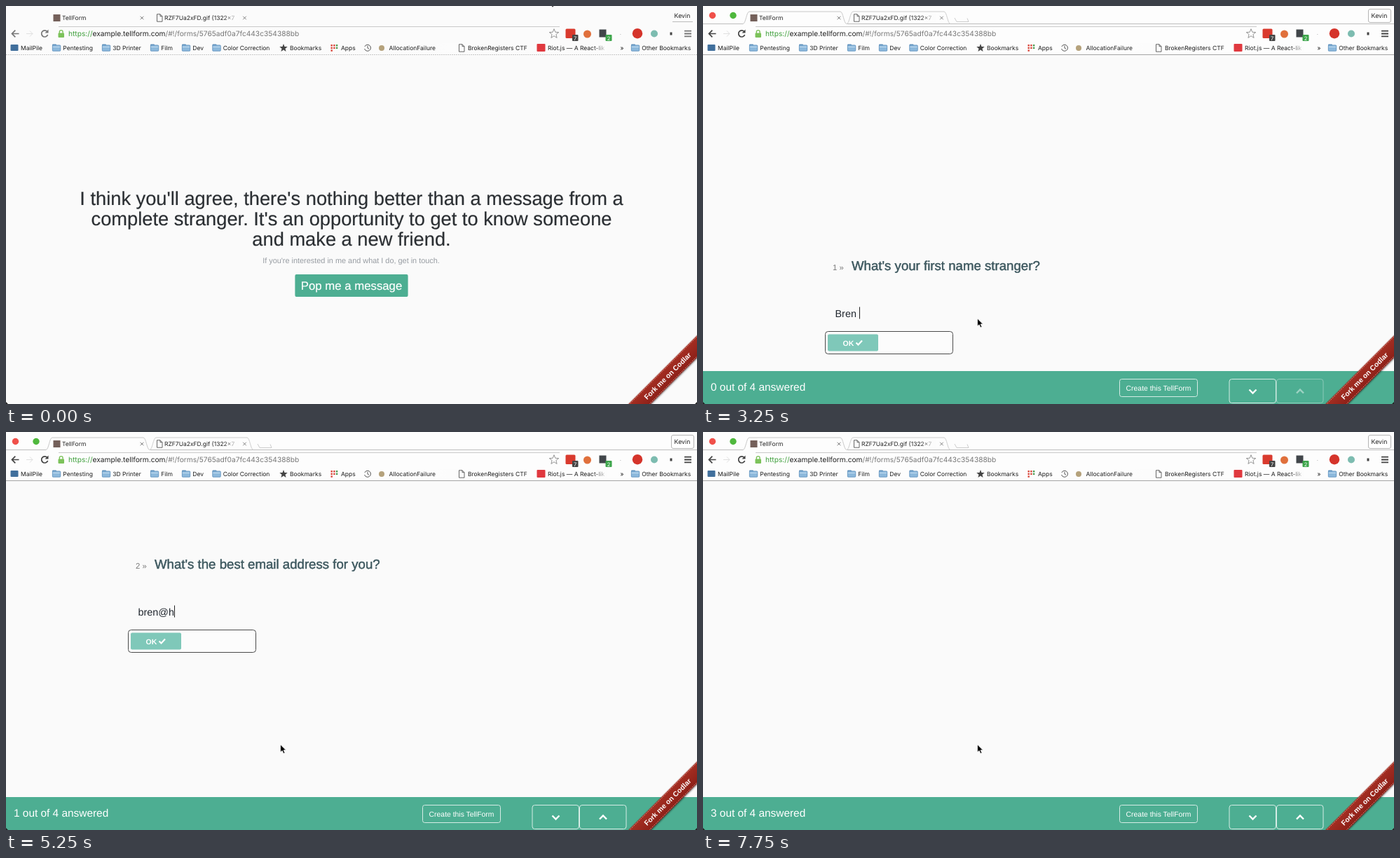
Animation, 986 px wide and 568 px high, one loop 8 s. Source, as an HTML page:

```html
<!DOCTYPE html>
<html lang="en">
<head>
<meta charset="utf-8">
<title>Form demo</title>
<style>
  html, body { margin: 0; width: 100%; height: 100%; overflow: hidden; background: #fafafa; }
  svg { display: block; }
  text { white-space: pre; font-family: "Liberation Sans", Arial, sans-serif; text-rendering: geometricPrecision; }
  .ui text { font-family: Inter, sans-serif; }
</style>
</head>
<body>
<svg id="stage" width="986" height="568" viewBox="0 0 986 568"></svg>
<script>
const LOOP = 8000, GREEN = '#4dae92', INK = '#2b2f33', SLATE = '#3c575e';

// Markup helpers
const text = (x, y, size, fill, str, more = '') =>
  `<text x="${x}" y="${y}" font-size="${size}" fill="${fill}" ${more}>${str}</text>`;
const rect = (x, y, w, h, fill, r = 0, more = '') =>
  `<rect x="${x}" y="${y}" width="${w}" height="${h}" rx="${r}" fill="${fill}" ${more}/>`;
const dot = (x, y, r, fill) => `<circle cx="${x}" cy="${y}" r="${r}" fill="${fill}"/>`;
const line = (d, stroke, width = 1, more = '') =>
  `<path d="${d}" fill="none" stroke="${stroke}" stroke-width="${width}" ${more}/>`;
const shape = (d, fill, more = '') => `<path d="${d}" fill="${fill}" ${more}/>`;
const group = (id, body, more = '') => `<g id="${id}" ${more}>${body}</g>`;
const middle = 'text-anchor="middle"';
const heavier = (color, width) => `stroke="${color}" stroke-width="${width}"`;

const folder = x => rect(x, 54.5, 6, 3, '#5f92bd', 1) + rect(x, 56, 12, 8.5, '#8db9dc', 1) +
  line(`M${x + .5} 58.5h11`, '#c3dcf0') + rect(x + .3, 55.8, 11.4, 8.4, 'none', 1, heavier('#5d8fba', .7));
const page = (x, y) => line(`M${x} ${y}h4.5l3 3v7.5h-7.5zM${x + 4.5} ${y}v3h3`, '#555', .9);
const star = (x, y, r, more) => {
  const points = Array.from({ length: 10 }, (_, i) => {
    const a = i * Math.PI / 5, d = i % 2 ? r * .43 : r;
    return [x + d * Math.sin(a), y - d * Math.cos(a)].map(v => v.toFixed(1));
  });
  return `<polygon points="${points.join(' ')}" ${more}/>`;
};
const fade = (x, y, w) => rect(x, y, w, 13, 'url(#fade)');
const cross = (x, y) => line(`M${x - 2.3} ${y - 2.3}l4.6 4.6m0-4.6l-4.6 4.6`, '#777', .9);
const label = (x, str) => text(x, 62.7, 8.5, '#1c1c1c', str);
const tab = x => `M${x} 25.5c4 0 5-17.5 9-17.5h130c4 0 5 17.5 9 17.5`;

function tabStrip() {
  return group('active',
      rect(0, 0, 986, 70, '#fdfdfd') + dot(13.5, 13.5, 4.7, '#f0504a') + dot(43, 13.5, 4.7, '#4fb83d') +
      line('M0 25.5h57M206 25.5h780', '#bdbdbd') + line(tab(57), '#c2c2c2', .9) + line(tab(205), '#c8c8c8', .9) +
      line('M359 17l3 5.5h17l-2-5', '#ccc') + line('M0 69.5h986', '#a4a4a4') +
      rect(949.5, 4.5, 32, 19, '#fff', 2.5, 'stroke="#b4b4b4"')) +
    group('inactive', line('M951 22.5h29', '#bbb') + line('M0 69.5h986', '#c8c8c8', 1, 'stroke-dasharray="2 1"')) +
    rect(67.5, 12, 10, 10, '#74605a') + text(80, 20.2, 8.5, '#222', 'TellForm') + cross(194, 17) +
    page(215.5, 11.7) + text(226, 20.2, 8.5, '#222', 'RZF7Ua2xFD.gif (1322×7') + fade(310, 10, 22) + cross(340.5, 17) +
    text(965, 17, 8.8, '#222', 'Kevin', middle);
}

function toolbar() {
  const nav = line('M18.5 39.5h-10m4.8-4.8l-4.8 4.8l4.8 4.8', 'currentColor', 1.7) +
    line('M58.7 36.3a4.6 4.6 0 1 0 .9 4.7', 'currentColor', 1.7) + shape('M60.5 33.5v5h-5z', 'currentColor') +
    line('M968 35.7h10M968 39.5h10M968 43.3h10', 'currentColor', 1.8);
  return group('nav', nav) + line('M29 39.5h9m-4-4l4 4l-4 4', '#e0e0e0') +
    line('M75 29.5h715', '#c9c9c9') +
    rect(74.5, 38.5, 8.5, 6.5, '#7cc25a', 1) + line('M76.3 39v-2a2.4 2.4 0 0 1 4.8 0v2', '#7cc25a', 1.4) +
    `<text x="89" y="43" font-size="10.2" fill="#777"><tspan fill="#3d9f3a">https://</tspan><tspan fill="#222">example.tellform.com</tspan>/#!/forms/5765adf0a7fc443c354388bb</text>` +
    star(782, 39.7, 7, 'fill="#fff" stroke="#888" stroke-width=".9"') +
    rect(798.5, 32.5, 14, 13.5, '#d93a2e', 1.5) + rect(808, 41, 8.5, 9, '#444', 1) + text(812.2, 48.7, 7.5, '#fff', '7', middle) +
    dot(829.5, 40, 5.5, '#e0703c') + rect(846.5, 33.5, 10, 11, '#41464a') +
    rect(855.5, 41, 9, 9, '#3da54b', 1) + text(860, 48.7, 7.5, '#fff', '2', middle) +
    rect(876, 40, 1.5, 1, '#ccc') + dot(901, 39.2, 7.2, '#d5342b') + dot(925, 39.5, 5, '#7dbcb0') + rect(947.5, 37.5, 3, 4, '#444');
}

function bookmarks() {
  const grid = [0, 1, 2, 3, 4, 5, 6].map(i =>
    rect(463.5 + i % 3 * 3.7, 55 + (i / 3 | 0) * 3.7, 2.4, 2.4, ['#d9463b', '#d9463b', '#4a9b50'][i % 3])).join('');
  const folders = [[66, 'Pentesting'], [137, '3D Printer'], [206, 'Film'], [251, 'Dev'], [294.5, 'Color Correction'], [892, 'Other Bookmarks']];
  return rect(6.5, 55, 11, 9, '#416f9c', 1) + label(21, 'MailPile') +
    folders.map(([x, name]) => folder(x) + label(x + 15.3, name)).join('') +
    star(396, 60, 6, 'fill="#444"') + label(405, 'Bookmarks') + grid + label(478, 'Apps') +
    line('M511.8 58a4.5 4.5 0 1 1-.2 3M516 57v3l2 1.3', '#555', 1) +
    dot(536, 60, 4, '#b5a27c') + label(546.5, 'AllocationFailure') + fade(610, 53, 19) + rect(629, 53, 14, 13, '#fcfcfc') +
    page(646.5, 54.7) + label(659, 'BrokenRegisters CTF') +
    rect(757.5, 54, 12, 11, '#e0393f', 1) + label(773, 'Riot.js — A React-lik') + fade(838, 53, 20) + label(876.5, '»');
}

function welcome() {
  const lines = ["I think you'll agree, there's nothing better than a message from a",
    "complete stranger. It's an opportunity to get to know someone", 'and make a new friend.'];
  return lines.map((s, i) => text(493, 284 + 29 * i, 27.25, INK, s, middle + heavier(INK, .2))).join('') +
    text(492.5, 367, 10.9, '#979ca2', "If you're interested in me and what I do, get in touch.", middle) +
    rect(412.4, 383, 161.2, 32, GREEN, 2) + text(493, 404.7, 16.8, '#fff', 'Pop me a message', middle + heavier('#fff', .2));
}

// Questions are drawn relative to their heading baseline
const heading = (x, n, str) => text(x, 0, 11.3, '#777', n + ' »') +
  text(x + 27, 0, 18.65, SLATE, str, heavier(SLATE, .45));
const okButton = id => group(id, rect(174.5, 87.5, 182, 32, '#fcfcfc', 4, 'stroke="#4a4a4a"') +
  rect(178, 91.5, 72, 24, '#7fc8b9', 2) + text(199.5, 107.5, 10.5, '#fff', 'OK', 'font-weight="bold"') +
  line('M218.5 103.5l3 3l5.5-6', '#fff', 2.2));
const field = id => text(188.5, 66.5, 14.4, '#20262e', '', `id="${id}"`) +
  rect(0, 52.5, 1, 17, '#222', 0, `id="${id}Caret"`);

function choice(n, x, y, textX, str) {
  return rect(x, y, 183, 25, '#fcfcfc', 3, 'stroke="#777"') +
    text(x + 25.5, y + 16, 10, n === 3 ? '#c4c4c4' : '#666', n, 'font-weight="bold"') +
    line(`M${textX - 13} ${y + 10}q3-2 6 0`, '#aaa', .8, 'stroke-dasharray="1 2"') + text(textX, y + 16, 10.8, '#666d75', str);
}

function questions() {
  return group('q1', heading(185, 1, "What's your first name stranger?") + field('name') + okButton('ok1')) +
    group('q2', heading(185, 2, "What's the best email address for you?") + field('email') +
      group('error', dot(190.7, 101.5, 4.8, '#a83c3c') + rect(190, 98.3, 1.5, 4, '#fff') + rect(190, 103.3, 1.5, 1.5, '#fff') +
        text(199, 105.5, 10.4, '#a5403f', 'Please enter a valid email address')) + okButton('ok2')) +
    group('q3', heading(173.5, 3, "What's your message about?") +
      choice(1, 179.5, 46.5, 230.5, "I'd like to work with you") + choice(2, 373.5, 46.5, 428.5, 'I have some feedback') +
      choice(3, 179.5, 82.5, 221.5, "I'm looking for some advice") + choice(4, 373.5, 82.5, 437, "I'd just like to chat"));
}

function footer() {
  const key = (x, d) => rect(x, 532.5, 66.5, 34, 'none', 3.5, 'stroke="#d5ece5"') + line(`M${x + 28.5} ${d}`, '#fff', 2.4);
  return rect(0, 521, 986, 47, GREEN) + text(11, 549, 15.4, '#fff', '', 'id="count"') +
    rect(594.5, 532.5, 111, 25, 'none', 3, 'stroke="#d5ece5"') + text(650, 549, 10.4, '#fff', 'Create this TellForm', middle) +
    key(751, '547.5l5 5l5-5') + group('up', key(818.5, '552.5l5-5l5 5'));
}

function ribbon() {
  const stitch = y => line(`M-90 ${y}h180`, '#d9958c', .8, 'stroke-dasharray="2 1.5"');
  return `<g transform="translate(944 528) rotate(-45)">` +
    rect(-90, -11.2, 180, 22.4, 'url(#red)', 0, 'style="filter: drop-shadow(0 1.5px 1px #0008)"') +
    stitch(-9.9) + stitch(9.9) +
    text(0, 3.6, 10.2, '#fff', 'Fork me on Codlar', `${middle} font-weight="bold"`) + '</g>';
}

document.getElementById('stage').innerHTML = `<defs>
  <linearGradient id="fade"><stop stop-color="#fcfcfc" stop-opacity="0"/><stop offset="1" stop-color="#fcfcfc"/></linearGradient>
  <linearGradient id="red" x2="0" y2="1"><stop stop-color="#a52e22"/><stop offset="1" stop-color="#8c2018"/></linearGradient></defs>` +
  rect(0, 0, 986, 568, '#fafafa') + group('welcome', welcome()) + questions() +
  rect(979, 0, 6, 108, '#808080', 3, 'id="thumb"') +
  group('chrome', rect(0, 0, 986, 69, '#fbfbfb') + tabStrip() + toolbar() + bookmarks(), 'class="ui"') +
  group('footer', footer()) + ribbon() + shape('M0 565v3h3zM986 565v3h-3z', '#222') +
  group('pointer', shape('M0 0v11l2.6-2.3l1.9 4.2l2-.9l-1.9-4h3.4z', '#000', heavier('#fff', .8)));

// Motion
const el = id => document.getElementById(id);
const clamp = v => Math.max(0, Math.min(1, v));
const ramp = (t, from, to) => clamp((t - from) / (to - from));
const ease = p => p * p * (3 - 2 * p);
const mix = (a, b, p) => a + (b - a) * p;
const place = (id, x, y) => el(id).setAttribute('transform', `translate(${x} ${y})`);
const opacity = (id, v) => {
  el(id).style.opacity = v;
  el(id).style.visibility = v > 0 ? 'visible' : 'hidden';
};

function type(id, str, count) {
  const node = el(id);
  node.textContent = str.slice(0, Math.max(0, Math.floor(count + 1e-6)));
  el(id + 'Caret').setAttribute('x', Math.round(188.5 + node.getComputedTextLength()));
}

function question(id, t, start, end, baseline, rise) {
  const p = ramp(t, start, start + 240);
  opacity(id, t < end ? p : 0);
  place(id, 0, baseline + rise * (1 - ease(p)));
}

function render(t) {
  const focused = t >= 500;
  opacity('active', +focused);
  opacity('inactive', +!focused);
  el('nav').style.color = focused ? '#444' : '#777';

  opacity('welcome', 1 - ramp(t, 1400, 1650));
  opacity('footer', ramp(t, 1450, 1750));
  question('q1', t, 1650, 4000, 377, 0);
  question('q2', t, 4000, 6500, 195, 150);
  question('q3', t, 6500, 7750, 207, 150);

  type('name', 'Bren ', 1 + (t - 2750) / 125);
  type('email', 'bren@home.test', 3 + (t - 4750) * 11 / 1500);
  const invalid = t >= 5500;
  opacity('error', invalid && t < 6500 ? 1 : 0);
  place('ok2', 0, invalid ? 54.5 : 0);

  const answered = [4000, 6500, 7750].filter(at => t >= at).length;
  el('count').textContent = answered + ' out of 4 answered';
  el('up').style.opacity = answered ? 1 : .45;

  const thumb = t < 6500 ? 1 - ramp(t, 4800, 5000) : 1 - ramp(t, 7600, 7750);
  opacity('thumb', t >= 4000 ? thumb : 0);
  el('thumb').setAttribute('y', mix(185, 259.5, ease(ramp(t, 6500, 6740))));

  const enter = ease(ramp(t, 0, 1200)), leave = ease(ramp(t, 1700, 2450));
  place('pointer', mix(mix(775, 503, enter), 391.5, leave), mix(mix(-11, 411.5, enter), 446, leave));
}

function tick() {
  render(performance.now() % LOOP);
  requestAnimationFrame(tick);
}
tick();
</script>
</body>
</html>
```
